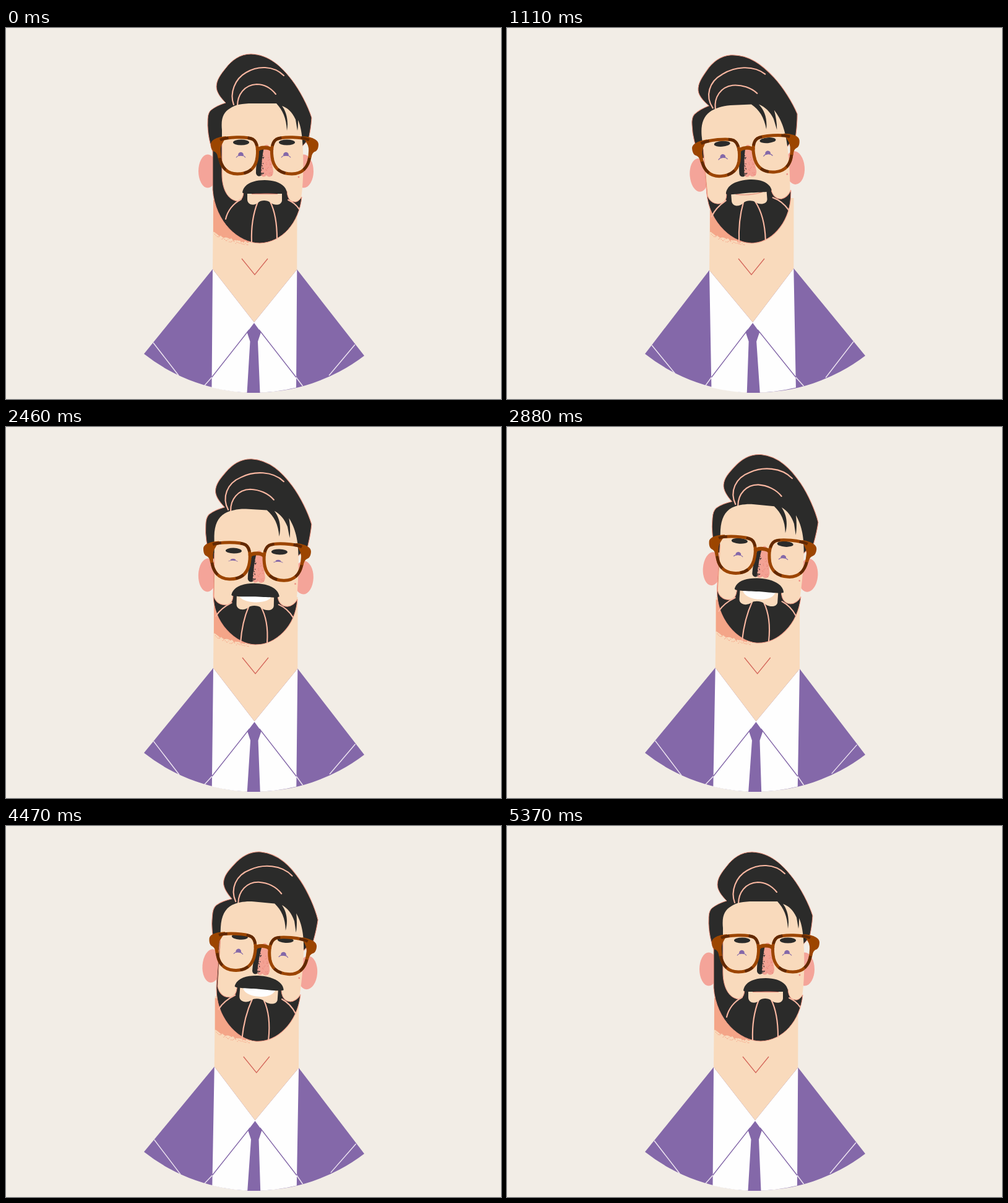
Write an HTML page that moves like this. It is 800 px wide and 600 px high and loops after 5.4 s.

```html
<!DOCTYPE html>
<html lang="en">
<head>
<meta charset="utf-8">
<title>Bearded man</title>
<style>
  html, body { margin: 0; width: 100%; height: 100%; overflow: hidden; background: #f2ede6; }
  svg { display: block; width: 800px; height: 600px; }
  .skin { fill: #f9dabc; }
  .dark { fill: #2b2b2a; }
  .purple { fill: #8468a9; }
  .pink { fill: #f4a499; }
  .white { fill: #fefefe; }
  .fringe { stroke: #f29a85; stroke-width: 1; }
  .line { fill: none; stroke: #fab8a2; stroke-width: 2.1; stroke-linecap: round; }
  .seam { fill: none; stroke-width: 1.4; }
  .rim { fill: none; stroke: #9c4500; stroke-width: 5; }
  .spots { fill: none; stroke: #4f2105; stroke-width: 4.6; stroke-dasharray: 14 31 22 40; stroke-opacity: .75; }
  .red { fill: none; stroke: #d4665a; stroke-width: 1.3; }
</style>
</head>
<body>
<svg viewBox="0 0 800 600">
  <defs>
    <path id="lens" d="M346 181C357 176 390 175 399 180C407 185 408 200 405 214C401 230 389 236 374 236C357 236 347 225 345 207C344 197 343 188 346 181Z"/>
    <g id="side">
      <use href="#lens" class="rim"/>
      <path fill="#9c4500" d="M356 175C343 176 331 180 331 188C331 194 333 199 337 200C341 202 342 206 343 212L348 190Z"/>
      <use href="#lens" class="spots"/>
    </g>
    <g id="eye">
      <path d="M-7.5 4.5C-4 -.5 4 -.5 7.5 4.5" fill="none" stroke="#8468a9" stroke-width="1.2"/>
      <path class="purple" d="M-3.6 2.2A4.2 4.2 0 1 1 3.6 2.2Q0 1.2 -3.6 2.2Z"/>
    </g>
  </defs>

  <path id="jacket" class="purple"/>
  <path id="shirt" class="white"/>
  <path id="tie" class="purple"/>
  <path id="collar" class="seam" stroke="#8468a9"/>
  <path id="seams" class="seam" stroke="#efe6f2"/>

  <g id="earBase">
    <g id="ears">
      <ellipse class="pink" cx="322" cy="231.5" rx="15" ry="27"/>
      <ellipse class="pink" cx="477" cy="231.5" rx="16" ry="27"/>
    </g>
  </g>

  <path id="neck" class="skin"/>
  <path id="throat" class="red" d="M381 373L402 399L423 373"/>
  <path id="shadow" fill="#f4a588"/>

  <g id="head">
    <g id="hair">
      <path class="dark fringe" d="M336 205C330 190 325 170 326 150C326 143 327 137 331 133C337 128 345 124 355 121C347 113 340 104 340 95C340 84 347 75 355 65C365 52 378 42 396 42C425 43 445 62 462 84C475 101 488 126 494 145C493 160 491 170 489 180L474 197Z"/>
      <path id="locks" class="line"/>
    </g>
    <path id="face" class="skin"/>
    <g id="beardBox">
      <path id="beard" class="dark fringe"/>
      <path id="strands" class="line"/>
    </g>
    <g id="mouth">
      <path class="skin" d="M-28 5L28 5L28 22C27 31 14 30 9 25C4 21 -6 21 -10 25C-16 31 -28 30 -28 20Z"/>
      <g id="smile">
        <path id="teeth" class="white"/>
        <path id="lip" class="red"/>
        <path class="dark" d="M-36 9C-34 -5 -18 -11 0 -11C19 -11 34 -4 36 9C34 12 22 11 0 10.5C-23 11 -34 12 -36 9Z"/>
      </g>
    </g>
    <circle id="mole" cx="464" cy="241" r="1.4" fill="#ee8f84"/>
    <g id="features">
      <path class="dark" d="M411 194C406 205 404 222 404 235C405 240 410 241 413 238C415 220 417 205 417 195Z"/>
      <path fill="#f3a294" d="M418 190C424 186 427 192 428 205L432 232C432 241 424 243 421 238C417 243 412 240 412 236C413 215 415 200 418 190Z"/>
      <path id="grain" class="dark"/>
      <path id="grainPink" fill="#e98679"/>
      <g id="brows">
        <ellipse class="dark" cx="380" cy="185" rx="13" ry="4.5"/>
        <ellipse class="dark" cx="454" cy="185" rx="13" ry="4.5"/>
      </g>
      <use id="eyeL" href="#eye"/>
      <use id="eyeR" href="#eye"/>
      <use href="#side"/>
      <use href="#side" transform="translate(836) scale(-1 1)"/>
      <path d="M406 198C410 192 426 192 430 198" fill="none" stroke="#9c4500" stroke-width="6"/>
    </g>
  </g>
</svg>

<script>
const LOOP = 5400;
const $ = id => document.getElementById(id);
const set = (id, name, value) => $(id).setAttribute(name, value);
const move = (id, value) => set(id, 'transform', value);

// lean: body, rot/x/y: head, turn: to the right, top: hair and ears,
// look: eyes and glasses, lips: mouth height
const POSES = {
  rest:  { lean: 0,    rot: 0,    x: 0,  y: 0,  turn: 1, top: 0,  look: 0,  lips: 0,  brow: 0,  smile: 0,   open: 1 },
  left:  { lean: -7,   rot: -4.4, x: -3, y: 0,  turn: 0, top: 0,  look: 0,  lips: 0,  brow: -1, smile: .25, open: 1 },
  up:    { lean: -4.5, rot: -2.2, x: -3, y: -5, turn: 0, top: -2, look: -5, lips: -7, brow: -5, smile: 0,   open: 1 },
  down:  { lean: 1,    rot: 1.5,  x: 1,  y: 4,  turn: 0, top: 6,  look: 7,  lips: 6,  brow: 5,  smile: .7,  open: .5 },
  right: { lean: 3,    rot: 4.4,  x: 2,  y: 0,  turn: 0, top: 0,  look: 0,  lips: 0,  brow: -4, smile: 1,   open: 1 }
};
const KEYS = [
  [0, 'rest'], [120, 'rest'], [820, 'left'], [1620, 'left'], [1980, 'up'],
  [2460, 'down'], [3100, 'right'], [4330, 'right'], [5180, 'rest'], [LOOP, 'rest']
];

// Each pair: facing front, turned right
const FACE = [
  'M332 200L331 168C331 150 336 138 347 131C356 126 368 123 381 123L415 124C427 134 434 146 436 166C439 150 436 136 427 125C437 130 444 138 449 150L453 168C454 158 453 146 451 136C459 148 467 165 468 200C469 230 468 255 466 275C460 312 430 335 402 336C370 335 338 310 333 275L332 240Z',
  'M349 200L349 165C347 145 352 136 362 130C370 124 382 122 398 122L437 122C447 133 453 145 454 166C457 150 453 135 446 126C456 130 462 135 468 148L471 166C472 160 472 155 472 149C476 158 479 170 480 200C481 230 480 255 477 275C468 312 440 335 410 336C380 335 345 310 336 275L335 240Z'
];
const BEARD = [
  'M332 190L332 262C333 312 370 348 402 348C435 347 466 315 468 267C464 275 459 279 452 280C442 280 437 272 436 262L364 262C364 272 361 280 352 280C344 281 336 276 333 266L332 190Z',
  'M334 185L334 262C338 314 376 348 410 348C446 347 474 315 478 273C474 279 470 282 466 281C458 281 455 274 454 264L384 264C384 272 381 280 374 280C358 278 349 260 349 236L349 185Z'
];
const STRANDS = [
  'M337 300C342 291 350 283 362 276M378 346C379 320 384 297 390 281M421 344C422 320 418 297 409 281M462 299C456 289 449 282 438 277',
  'M355 309C358 296 367 284 380 277M397 346C396 320 401 296 407 281M438 341C438 318 434 295 427 281M474 293C468 285 464 282 456 278'
];
const LOCKS = [
  'M361 125C350 105 358 82 380 72C400 61 430 60 448 77M365 127C364 108 376 92 395 91C410 91 424 97 433 107',
  'M368 124C361 105 370 82 388 72C406 61 432 60 449 77M374 126C374 108 385 92 405 91C418 91 428 97 436 107'
];

const numbers = s => s.match(/-?\d+(\.\d+)?/g).map(Number);
function blend([a, b], k) {
  const end = numbers(b);
  let i = 0;
  return a.replace(/-?\d+(\.\d+)?/g, n => (+n + (end[i++] - n) * k).toFixed(2));
}

// Monotone cubic through the keys
const slope = (i, p) => (POSES[KEYS[i + 1][1]][p] - POSES[KEYS[i][1]][p]) / (KEYS[i + 1][0] - KEYS[i][0]);
function tangent(i, p) {
  if (i === 0 || i === KEYS.length - 1) return 0;
  const a = slope(i - 1, p), b = slope(i, p);
  return a * b <= 0 ? 0 : 2 * a * b / (a + b);
}
function poseAt(t) {
  let i = 0;
  while (t >= KEYS[i + 1][0]) i++;
  const [t0, from] = KEYS[i], [t1, to] = KEYS[i + 1];
  const span = t1 - t0, u = (t - t0) / span, v = 1 - u, pose = {};
  for (const p in POSES.rest) {
    pose[p] = POSES[from][p] * (1 + 2 * u) * v * v + POSES[to][p] * u * u * (3 - 2 * u)
      + span * (tangent(i, p) * u * v * v - tangent(i + 1, p) * u * u * v);
  }
  return pose;
}

let seed = 7;
const rand = () => (seed = seed * 16807 % 2147483647) / 2147483647;
const speck = (x, y) => `M${x.toFixed(1)} ${y.toFixed(1)}h1.2v1.2h-1.2z`;
const scatter = (n, place) => Array.from({ length: n }, () => speck(...place(rand(), rand()))).join('');

function drawTexture() {
  let edge = 'M335 278L335 330';
  let dots = '';
  for (let x = 336; x < 392; x += 2) {
    const y = 331 + 15 * Math.sin((x - 335) / 57 * Math.PI / 2);
    edge += `L${x} ${(y + rand() * 4 - 2).toFixed(1)}`;
    dots += speck(x + rand(), y + rand() * 5);
  }
  set('shadow', 'd', edge + 'L394 346L400 300Z' + dots);
  set('grain', 'd', scatter(26, (a, b) => [412 + a * 4, 200 + b * 38]));
  set('grainPink', 'd', scatter(22, (a, b) => [418 + a * 11, 208 + b * 30]));
}

function drawBody(d) {
  const left = `${334 + d} ${390 - d / 4}`, right = `${470.3 + d} ${390.5 + d / 4}`;
  const cx = 401 + d * .55, tip = `${cx} 476`;
  const bl = 332.5 + d * .3, br = 469 + d * .3, foot = 400 + d * .25;
  set('jacket', 'd', `M${left}L223 527A290 290 0 0 0 579 530L${right}Z`);
  set('shirt', 'd', `M${left}L${tip}L${right}L${br} 581.5A290 290 0 0 1 ${bl} 581.5Z`);
  set('neck', 'd', `M${335 + d} 275H${470.5 + d}L${right}L${tip}L${left}Z`);
  set('tie', 'd', `M${cx} 477L${cx + 11} 492L${cx + 6} 507L${foot + 10.5} 590H${foot - 10.5}L${cx - 6.5} 507L${cx - 11.5} 492Z`);
  set('collar', 'd', `M${cx - 8} 488L${bl} 565M${cx + 8} 488L${br} 565`);
  set('seams', 'd', `M${bl} 565L321 578M${br} 565L479.5 579`
    + `M${238 + d * .57} ${509 - d * .57}L${279 + d * 1.1} ${562 + d * .5}`
    + `M${564 + d * .57} ${512 + d * .7}L${522 + d} ${562 - d * .5}`);
  move('throat', `translate(${d})`);
}

function drawHead(p) {
  const k = p.turn, base = `translate(${p.x} ${p.y}) rotate(${p.rot} 400 346)`;
  move('head', base);
  move('earBase', base);
  move('ears', `translate(${4 * k} ${p.top})`);
  move('shadow', `translate(${p.lean} ${p.y})`);
  move('hair', `translate(${402.3 + 7.7 * k} ${p.top}) scale(${1.018 - .018 * k} 1) translate(-410)`);
  set('locks', 'd', blend(LOCKS, k));

  set('face', 'd', blend(FACE, k));
  move('face', `translate(0 ${p.top})`);
  set('beard', 'd', blend(BEARD, k));
  set('strands', 'd', blend(STRANDS, k));
  move('beardBox', `translate(0 348) scale(1 ${1 - p.lips / 83}) translate(0 -348)`);

  const s = p.smile;
  move('mouth', `translate(${400 + 18 * k} ${257 + p.lips}) scale(${1 + .11 * s} 1)`);
  move('smile', `translate(0 ${-4.5 * s})`);
  set('teeth', 'd', `M-24 9C-22 ${9 + 20 * s} 22 ${9 + 20 * s} 24 9Z`);
  set('teeth', 'opacity', Math.min(1, Math.max(0, (s - .3) * 4)));
  set('lip', 'd', `M-21 11Q0 ${11 + 20 * s} 21 11`);
  set('lip', 'opacity', Math.max(0, 1 - s * 1.6));

  move('mole', `translate(${9 * k} ${p.look})`);
  move('features', `translate(${17 * (k - 1)} ${p.look})`);
  move('brows', `translate(0 ${p.brow})`);
  move('eyeL', `translate(379.5 205) scale(1 ${p.open})`);
  move('eyeR', `translate(452.5 205) scale(1 ${p.open})`);
}

function frame() {
  const pose = poseAt(performance.now() % LOOP);
  drawBody(pose.lean);
  drawHead(pose);
  requestAnimationFrame(frame);
}

drawTexture();
frame();
</script>
</body>
</html>
```
